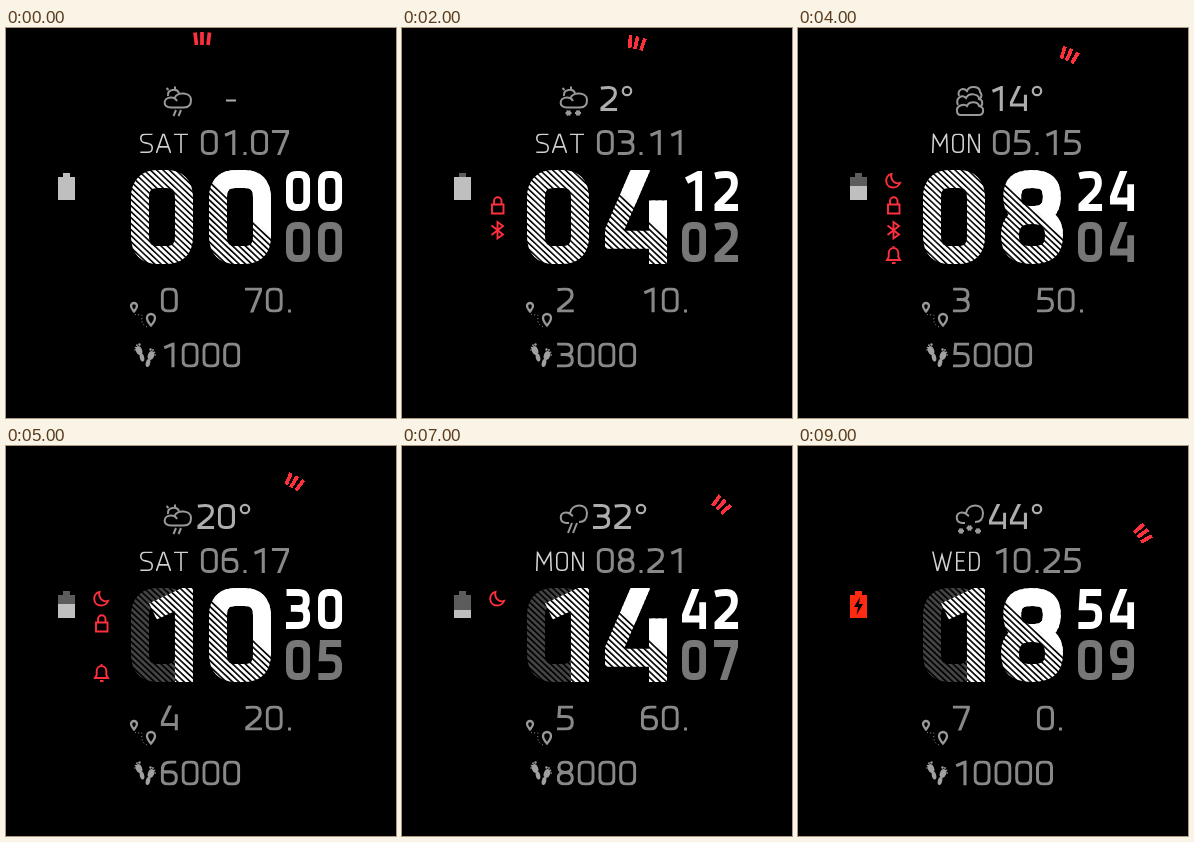
Write an HTML page that moves like this. It is 390x390 px and loops after 10000 ms.

```html
<!DOCTYPE html>
<html lang="en">
<head>
<meta charset="utf-8">
<title>Watch face</title>
<style>
html, body { margin: 0; width: 100%; height: 100%; overflow: hidden; background: #000; }
#face { display: block; width: 100vw; height: 100vh; fill: none; }
</style>
</head>
<body>
<svg id="face" viewBox="0 0 390 390" role="img">
  <defs>
    <pattern id="bright" y=".68" width="8" height="4.36" patternUnits="userSpaceOnUse" patternTransform="rotate(43.3)">
      <rect width="8" height="2.7" fill="#fff"/>
    </pattern>
    <pattern id="dim" y=".68" width="8" height="4.36" patternUnits="userSpaceOnUse" patternTransform="rotate(43.3)">
      <rect width="8" height="2.7" fill="#444"/>
    </pattern>
    <clipPath id="upper"><path d="M0,0H62V66L0,7.600Z"/></clipPath>
  </defs>
  <rect width="390" height="390" fill="#000"/>
  <g id="live"></g>
  <g id="route" stroke="#999" stroke-width="2.300">
    <path d="M128,283.500C126,281 125,280 125,278A3,3 0 0 1 131,278C131,280 130,281 128,283.500Z"/>
    <path d="M145,297.500C142,294 141,292 141,290A4,4 0 0 1 149,290C149,292 148,294 145,297.500Z"/>
    <path d="M129,286C131,289 137,284 136,289S137,297 141,299" stroke-width="1" stroke-dasharray="1 2.4"/>
  </g>
  <g id="feet" fill="#a0a0a0">
    <ellipse cx="133" cy="322.500" rx="3.100" ry="4.500" transform="rotate(-22 133 322.5)"/>
    <ellipse cx="136" cy="329.500" rx="2.200" ry="4" transform="rotate(-14 136 329.5)"/>
    <ellipse cx="145" cy="327.500" rx="3.100" ry="4.500" transform="rotate(22 145 327.5)"/>
    <ellipse cx="142" cy="335" rx="2.200" ry="4" transform="rotate(14 142 335)"/>
    <g id="toes">
      <circle cx="133.500" cy="316.500" r="1.200"/><circle cx="131" cy="317.200" r=".9"/>
      <circle cx="129.500" cy="319.500" r=".8"/><circle cx="129" cy="322" r=".8"/>
      <circle cx="144.500" cy="321.500" r="1.200"/><circle cx="147" cy="322" r=".9"/>
      <circle cx="148.600" cy="324.300" r=".8"/><circle cx="149.200" cy="327" r=".8"/>
    </g>
  </g>
</svg>
<script>
const face = document.getElementById('face');
const live = document.getElementById('live');

// Centre lines of the lettering on a 10 x 20 grid
const GLYPHS = {
  0: 'M0,5C0,1.5 1.5,0 4,0L6,0C8.5,0 10,1.5 10,5L10,15C10,18.5 8.5,20 6,20L4,20C1.5,20 0,18.5 0,15Z',
  1: 'M2.4,2.8L7.6,0L7.6,20',
  2: 'M.6,.4C2,0 3.5,0 5,0C8.5,0 9.8,1.7 9.8,5C9.8,7.8 8.9,9.5 7.2,11.4L.3,18.7L.3,20L10,20',
  3: 'M.3,0L5,0C8.5,0 9.7,1.5 9.7,4.7C9.7,8 8.5,9.6 5.5,9.6L2.8,9.6M5.5,9.6C8.8,9.6 10,11.5 10,14.8C10,18.5 8.5,20 5,20L0,20',
  4: 'M5.5,-1L-.1,14L-.1,16L10,16M10,8L10,20',
  5: 'M9.4,0L1,0L.5,8.6L5.5,8.6C8.8,8.6 10,10.5 10,14C10,18.3 8.5,20 5,20L.2,20',
  6: 'M8.8,0L6,0C1.5,0 0,2.5 0,8L0,15C0,18.5 1.5,20 4,20L6,20C8.5,20 10,18.5 10,14.6C10,10.8 8.5,9 6,9L0,9',
  7: 'M0,0L10,0L10,1.5L3.6,22',
  8: 'M5,9.5C2,9.5 .5,8 .5,4.8C.5,1.5 1.8,0 5,0C8.2,0 9.5,1.5 9.5,4.8C9.5,8 8,9.5 5,9.5ZM5,9.5C1.5,9.5 0,11.5 0,14.8C0,18.5 1.5,20 5,20C8.5,20 10,18.5 10,14.8C10,11.5 8.5,9.5 5,9.5Z',
  9: 'M1.2,20L4,20C8.5,20 10,17.5 10,12L10,5C10,1.5 8.5,0 6,0L4,0C1.5,0 0,1.5 0,5.4C0,9.2 1.5,11 4,11L10,11',
  S: 'M9.5,0L4,0C1,0 0,1.5 0,4.5C0,8 1,9 4,9.6L6.5,10.2C9,10.8 10,12 10,15C10,18.8 9,20 6,20L.3,20',
  A: 'M-.3,21L4.6,0L5.4,0L10.3,21M1.6,14L8.4,14',
  T: 'M0,0L10,0M5,0L5,20',
  M: 'M0,20L.5,0L5,13L9.5,0L10,20',
  O: 'M0,5C0,1.5 1.5,0 4,0L6,0C8.5,0 10,1.5 10,5L10,15C10,18.5 8.5,20 6,20L4,20C1.5,20 0,18.5 0,15Z',
  N: 'M0,20L0,0L.8,0L9.2,20L10,20L10,0',
  W: 'M0,-1L2.4,20L2.7,20L5,3L7.3,20L7.6,20L10,-1',
  E: 'M10,0L0,0L0,20L10,20M0,9.8L8.5,9.8',
  D: 'M0,0L5,0C9,0 10,3 10,10C10,17 9,20 5,20L0,20Z',
  H: 'M0,0L0,20M10,0L10,20M0,9.8L10,9.8',
  U: 'M0,0L0,15C0,18.5 1.5,20 4,20L6,20C8.5,20 10,18.5 10,15L10,0'
};
const LETTER_W = { S: 13, A: 15, T: 14, M: 16, O: 12, N: 12, W: 20, E: 9, D: 11, H: 12, U: 12 };

const WEEKDAYS = ['SAT', 'THU', 'SAT', 'THU', 'MON', 'SAT', 'WED', 'MON', 'SAT', 'WED'];
const SKY = ['showers', 'showers', 'flurries', 'sunny', 'overcast', 'showers', 'flurries', 'rain', 'snow', 'heavySnow'];
const BATTERY_TOP = [145, 145, 149, 153, 158, 158, 162, 164, 168];
const RED = '#ff303e', GREY = '#888', LIGHT = '#adadad';

const line = (d, color, width = 2, extra = '') =>
  `<path d="${d}" stroke="${color}" stroke-width="${width}" ${extra}/>`;
const box = (x, y, w, h, color) =>
  `<rect x="${x}" y="${y}" width="${w}" height="${h}" fill="${color}"/>`;
const pad = n => String(n).padStart(2, '0');

// One character that fills a w x h cell; the cell trims its ends
function glyph(ch, x, y, w, h, weight, color, extra = '') {
  const d = GLYPHS[ch].replace(/(-?[\d.]+),(-?[\d.]+)/g, (_, a, b) =>
    `${(weight / 2 + a * (w - weight) / 10).toFixed(2)},${(weight / 2 + b * (h - weight) / 20).toFixed(2)}`);
  return `<svg x="${x}" y="${y}" width="${w}" height="${h}">` +
    line(d, color, weight, `stroke-linecap="square" stroke-miterlimit="8" ${extra}`) + '</svg>';
}

function digits(value, x, y, color = GREY) {
  return [...String(value)].map((ch, i) => glyph(ch, x + i * 20.8, y, 17.2, 25, 3.1, color)).join('');
}

const dot = (x, y) => box(x, y, 3, 3, GREY);

function hours(h) {
  const [tens, ones] = pad(h);
  const shift = tens === '1' ? 10.5 : 0;
  const big = (ch, x, color, extra) => glyph(ch, x, 142, 62, 94, 18, color, extra);
  // The stripes of a shifted cell stay in line with those behind it
  const striped = shift
    ? `<svg x="125" y="142" width="62" height="94">${glyph(tens, shift, 0, 62, 94, 18, 'url(#bright)')}</svg>`
    : big(tens, 125, 'url(#bright)');
  return big('0', 125, 'url(#dim)') +
    (shift ? big(tens, 125 + shift, '#000') : '') +
    striped +
    big(ones, 203, 'url(#bright)') +
    big(ones, 203, '#fff', 'clip-path="url(#upper)"');
}

function pair(n, y, color) {
  const [a, b] = pad(n);
  return glyph(a, 280, y, 24.2, 40, 6.9, color) + glyph(b, 312, y, 24.2, 40, 6.9, color);
}

function weekday(word) {
  const widths = [...word].map(c => LETTER_W[c]);
  const gap = (48 - widths.reduce((a, b) => a + b)) / 2;
  let x = 134;
  return [...word].map((c, i) => {
    const out = glyph(c, x, 105.5, widths[i], 19.5, 1.6, '#d0d0d0');
    x += widths[i] + gap;
    return out;
  }).join('');
}

function temperature(t) {
  if (t < 0) return box(220, 71.5, 10, 2, LIGHT);
  const x = t < 10 ? 198 : 191;
  return digits(t, x, 58, LIGHT) +
    `<circle cx="${x + (t < 10 ? 27 : 48)}" cy="63" r="4.2" stroke="${LIGHT}" stroke-width="2.2"/>`;
}

function weather(kind) {
  const flake = (x, y) =>
    `M${x - 3},${y}h6M${x - 1.5},${y - 2.6}l3,5.2M${x + 1.5},${y - 2.6}l-3,5.2`;
  const small = 'M165,79.500C156,79.500 157,69.500 165,69.500C168,69.500 170,71 171,73' +
    'M168.500,70C171,63.500 185,64 185,72C185,78 181,79.500 178,79.500H165' +
    'M162,68C161,61 171,60 173,65M169,61V58.500M162.500,62l-2,-2';
  const large = 'M167,77H164C157,76 157,66.500 164,66.500C168,66.500 169,69 171,70' +
    'M168,67C170,57 185,57 185,67C185,74 181,76 177,76';
  const twoFlakes = flake(166.5, 85) + flake(176, 85);
  const shapes = {
    showers: small + 'M170,82l-2.500,6M175,82l-2.500,6',
    flurries: small + twoFlakes,
    sunny: 'M178,73a6,6 0 1 1 -12,0a6,6 0 1 1 12,0M172,63v-4M172,83v4M162,73h-4M182,73h4M165,66l-3,-3M179,66l3,-3M165,80l-3,3M179,80l3,3',
    overcast: 'M163,87H181C186,87 187,79 181,78C180,73 171,73 169,78C166,75 158,78 159,83C159,86 161,87 163,87Z' +
      'M160,77C157,70 164,66 168,70C171,64 181,66 181,71C185,72 185,76 183,78' +
      'M161,68C159,62 165,59 169,63C171,57 182,58 182,64C184,66 184,69 182,70',
    rain: large + 'M170,77l-4,10M175,77l-4,10',
    snow: large + twoFlakes,
    heavySnow: large + flake(163, 85) + flake(171.5, 82) + flake(180, 85)
  };
  return line(shapes[kind], '#999');
}

function battery(k) {
  const cell = (color, y0 = 145) =>
    (y0 < 149 ? box(57, y0, 7, 149 - y0, color) : '') +
    box(52, Math.max(y0, 149), 17, 172 - Math.max(y0, 149), color);
  if (k === 9) return cell('#ff2a12') + '<path d="M62,151L56,161H60L58.500,169L65,158H61Z" fill="#000"/>';
  return cell('#5c5c5c') + cell('#bfbfbf', BATTERY_TOP[k]);
}

// Each icon stays lit for four steps, starting one step after the last
function status(k) {
  const icons = [
    'M89.500,197.500L101,206.500L95.500,210.500V194L101,198L89.500,207',
    'M90,176.500H101.500V185.500H90ZM92,176V173A3.700,3.700 0 0 1 99.500,173V176',
    'M89,232H102L100.300,229V225C100.300,218.500 90.700,218.500 90.700,225V229ZM94,235h3.500M95.500,218v2',
    'M93.500,146C86,147.500 86.500,159.500 95,159.500C99,159.500 101,157.500 102,155C97,156.500 92,152 93.500,146Z'
  ];
  return icons.map((d, i) => k > i && k < i + 5 ? line(d, RED, 1.9) : '').join('');
}

function draw(k) {
  const metres = (k + 1) * 70;
  const rest = metres % 100;
  const [m1, m2] = pad(k + 1);
  const [d1, d2] = pad(7 + 2 * k);
  const date = [[m1, 194.7], [m2, 215.5], [d1, 245], [d2, 265.8]];
  live.innerHTML =
    `<g transform="rotate(${6 * k} 195 195)">` +
      line('M189,4.500L190.500,17M196,4V17M203.500,4.500L202,17', RED, 3.7, k ? 'shape-rendering="crispEdges"' : '') + '</g>' +
    weather(SKY[k]) + temperature(6 * k - 10) +
    weekday(WEEKDAYS[k]) +
    date.map(([c, x]) => digits(c, x, 102)).join('') + dot(237.5, 124) +
    battery(k) + status(k) +
    hours(2 * k) + pair(6 * k, 143, '#fff') + pair(k, 194, '#777') +
    digits(Math.floor(metres / 100), 154.7, 259.5) +
    digits(rest, 238.8, 259.5) + dot(rest ? 282 : 261, 281.5) +
    digits((k + 1) * 1000, 154.7, 314.5);
  face.setAttribute('aria-label', `${pad(2 * k)}:${pad(6 * k)}:${pad(k)} ${WEEKDAYS[k]} ${m1}${m2}.${d1}${d2}`);
}

let shown = -1;
function tick() {
  const k = Math.floor(performance.now() / 1000) % 10;
  if (k !== shown) draw(shown = k);
  requestAnimationFrame(tick);
}
tick();
</script>
</body>
</html>
```
